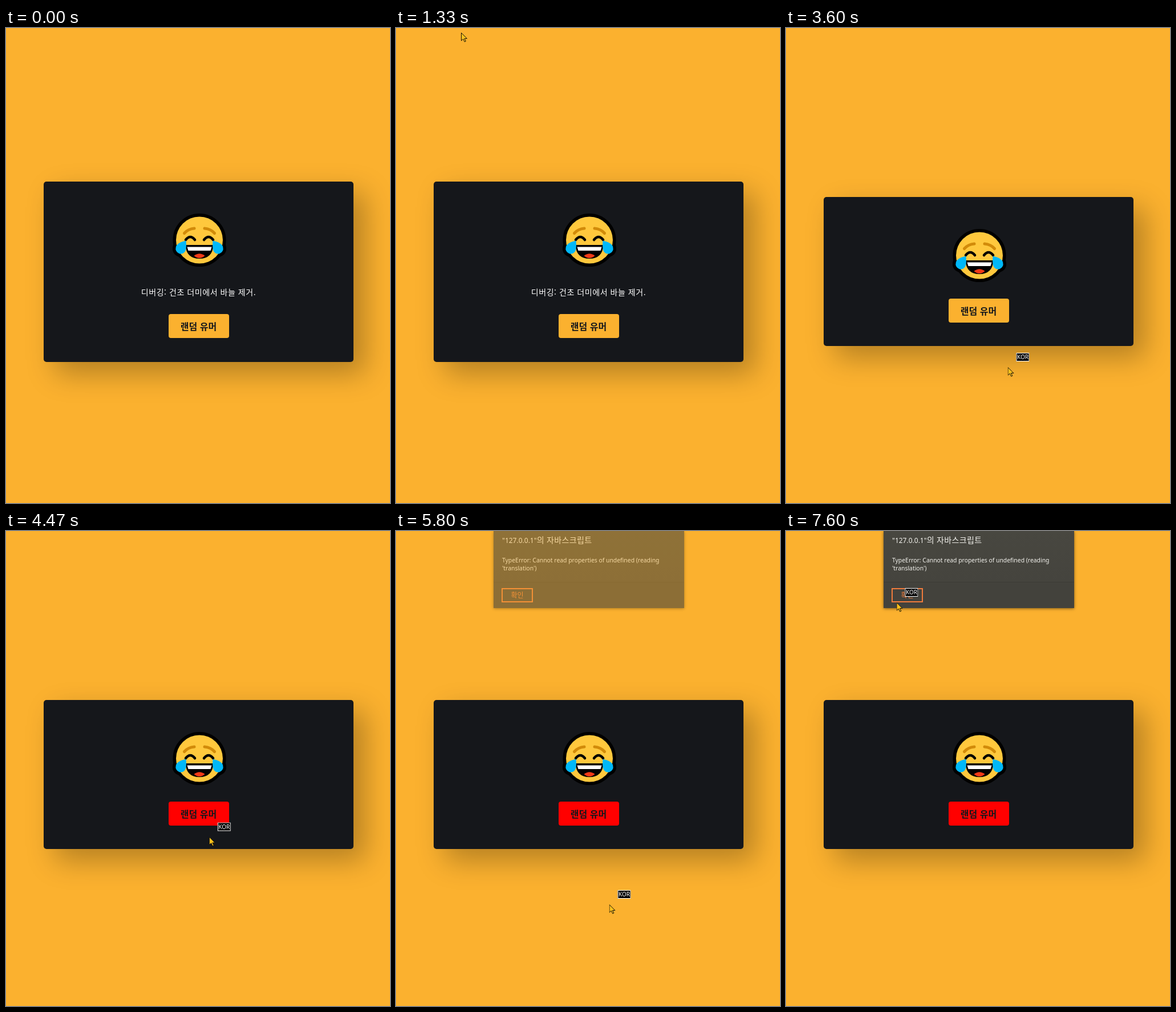
An HTML page that plays this animation: 673 px wide and 832 px high, repeating every 8 s.

```html
<!DOCTYPE html>
<html lang="ko">
<head>
<meta charset="utf-8">
<title>랜덤 유머</title>
<style>
  html, body { margin: 0; width: 100%; height: 100%; overflow: hidden; background: #fbb12f; }
  body { position: relative; font-family: "Noto Sans CJK KR", "Noto Sans CJK", sans-serif; }
  body > * { position: absolute; box-sizing: border-box; white-space: nowrap; }
  .latin { font-family: "Noto Sans", "Open Sans", sans-serif; }

  .card, .face, .joke, .button, .dialog, .cursor {
    animation: 8s -8ms infinite step-end;
  }
  .card {
    left: 66px; top: 269px; width: 543px; height: 315.5px; border-radius: 5px;
    background: #15171b; box-shadow: 20px 20px 50px rgba(0, 0, 0, .28);
    animation-name: card;
  }
  .face { left: 291.5px; top: 325px; width: 94px; height: 94px; animation-name: face; }
  .joke {
    left: 66px; top: 450px; width: 543px; text-align: center; color: #fff;
    font-size: 14px; font-weight: 300; line-height: 24px; letter-spacing: .55px;
    animation-name: joke;
  }
  .button {
    left: 284.5px; top: 501px; width: 106px; height: 42px; border-radius: 4px;
    background: #fbb12f; color: #15171b; text-align: center;
    font-size: 16px; font-weight: 700; line-height: 42px;
    animation-name: button;
  }
  .dialog {
    left: 171px; top: 0; width: 333.5px; height: 134.5px;
    background: linear-gradient(#484740, #45443e 89px, #3c3b36 89px, #3c3b36 90px, #43423c 90px);
    box-shadow: 0 1px 5px rgba(0, 0, 0, .5); color: #f4f3ee;
    animation-name: dialog;
  }
  .dialog * { position: absolute; left: 15px; }
  .title { top: 5px; font-size: 14px; font-weight: 300; line-height: 20px; letter-spacing: .35px; }
  .title .latin { position: static; font-size: 12px; font-weight: 500; letter-spacing: 0; }
  .message { top: 44px; font-size: 10.4px; line-height: 14px; }
  .ok {
    margin-left: -1px; top: 100px; width: 55px; height: 25px; box-sizing: border-box;
    border: 2px solid #f07b3c; color: #f07b3c; text-align: center;
    font-size: 12px; line-height: 20px;
  }
  .cursor { left: 0; top: 0; animation-name: cursor; }
  .cursor * { position: absolute; }
  .cursor svg { left: 0; top: 0; width: 13px; height: 18px; }
  .tag {
    left: 15px; top: -25px; width: 23px; height: 15px; box-sizing: border-box;
    border: 1px solid #fff; background: #000; color: #fff;
    font-size: 10px; line-height: 13px; display: flex; justify-content: center;
  }

  @keyframes card { 21.667%, to { top: 296px; height: 261px; } }
  @keyframes face { 21.667%, to { transform: translateY(27px); } }
  @keyframes joke { 21.667%, to { visibility: hidden; } }
  @keyframes button {
    21.667% { background: #fbb12f; transform: translateY(-27px); }
    55.833%, to { background: #f00; transform: translateY(-27px); }
  }
  @keyframes dialog {
    0% { opacity: 0; }
    72.5% { opacity: .6; }
    73.333%, to { opacity: 1; }
  }
  /* Pointer path, advancing 15 times a second */
  @keyframes cursor {
    0% { transform: translate(-99px, -99px); }
    1.667% { transform: translate(335px, 307px); animation-timing-function: steps(4); }
    5% { transform: translate(223px, 122px); animation-timing-function: steps(5); }
    9.167%, 10% { transform: translate(309px, 178px); animation-timing-function: steps(6); }
    15% { transform: translate(122px, 40px); animation-timing-function: steps(2); }
    16.667% { transform: translate(114px, 8px); animation-timing-function: steps(2); }
    18.333% { transform: translate(109px, -30px); }
    22.5% { transform: translate(255px, 10px); animation-timing-function: steps(2); }
    24.167% { transform: translate(291.5px, 229.5px); animation-timing-function: steps(2); }
    25.833%, 31.667% { transform: translate(291px, 224px); animation-timing-function: steps(5); }
    35.833%, 37.5% { transform: translate(389px, 600px); }
    38.333% { transform: translate(387px, 600px); }
    39.167%, 42.5% { transform: translate(390px, 598px); animation-timing-function: steps(3); }
    45% { transform: translate(388.5px, 594px); animation-timing-function: steps(5); }
    49.167%, 50.833% { transform: translate(345px, 508px); }
    51.667%, 55% { transform: translate(352px, 510px); animation-timing-function: steps(6); }
    60% { transform: translate(375px, 663px); animation-timing-function: steps(3); }
    62.5% { transform: translate(373.5px, 654px); }
    85.833% { transform: translate(373.5px, 652px); animation-timing-function: steps(6); }
    90.833% { transform: translate(166px, 235px); animation-timing-function: steps(3); }
    93.333% { transform: translate(180px, 145px); animation-timing-function: steps(2); }
    95%, to { transform: translate(193.5px, 125px); }
  }
</style>
</head>
<body>
  <div class="card"></div>

  <svg class="face" viewBox="0 0 94 94">
    <defs>
      <path id="tear" d="M23.5 47.5Q7 51 5.7 59A9 9 0 1 0 23 64Q24.5 57 23.5 47.5z"/>
      <g id="features" fill="none" stroke-linecap="round">
        <path d="M20.5 34.5Q27 27 38 26" stroke="#d28b0a" stroke-width="5"/>
        <path d="M23 46Q31 36 39 46" stroke="#000" stroke-width="4.5"/>
        <use href="#tear" fill="#00b8f8"/>
      </g>
    </defs>
    <g stroke="#000" stroke-width="11" stroke-linejoin="round">
      <circle cx="47" cy="46.5" r="41"/>
      <use href="#tear"/>
      <use href="#tear" transform="matrix(-1 0 0 1 94 0)"/>
    </g>
    <circle cx="47" cy="46.5" r="41" fill="#ffc83d"/>
    <path d="M22.5 55H71.5Q70 79 47 79T22.5 55z"/>
    <path d="M25.5 58.5H68.5L66.5 65H27.5z" fill="#fff"/>
    <path d="M37.5 74Q47 66.5 56.5 74Q47 82 37.5 74z" fill="#f03a17"/>
    <use href="#features"/>
    <use href="#features" transform="matrix(-1 0 0 1 94 0)"/>
  </svg>

  <div class="joke">디버깅: 건초 더미에서 바늘 제거.</div>
  <div class="button">랜덤 유머</div>

  <div class="dialog">
    <div class="title"><span class="latin">"127.0.0.1"</span>의 자바스크립트</div>
    <div class="message latin">TypeError: Cannot read properties of undefined (reading<br>'translation')</div>
    <div class="ok">확인</div>
  </div>

  <div class="cursor">
    <svg viewBox="0 0 13 18">
      <path d="M.5 .5V14.2L3.8 11.2L6.2 16.2L8.3 15.2L6 10.5H10.4z" fill="#fdc01c" stroke="#15130a"/>
    </svg>
    <div class="tag latin">KOR</div>
  </div>
</body>
</html>
```
